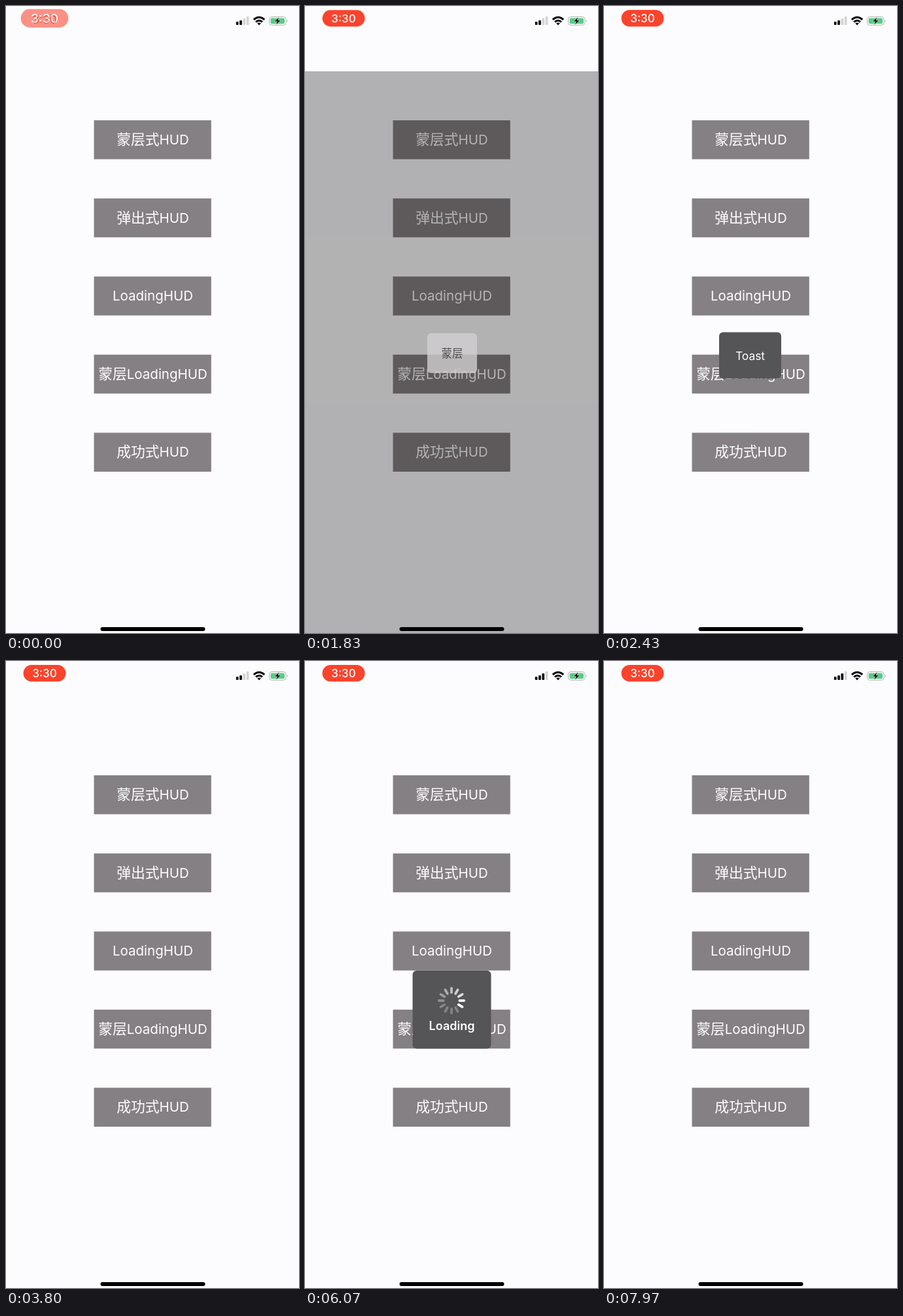
An HTML page for the animation above (8000 ms loop, 448 by 960 pixels).

```html
<!DOCTYPE html>
<html lang="zh">
<head>
<meta charset="utf-8">
<title>HUD</title>
<style>
html, body { margin: 0; width: 100%; height: 100%; overflow: hidden; background: #fcfcfe; }
svg { display: block; width: 100vw; height: 100vh; }
text { font-family: Inter, "Noto Sans CJK SC", "Noto Sans CJK", sans-serif; fill: #fff; text-anchor: middle; }
.label { font-size: 20.5px; }
.cjk { font-family: "Noto Sans CJK SC", "Noto Sans CJK", sans-serif; font-size: 21.8px; }
.hud { opacity: 0; }
#pill, #spinner { transform-box: fill-box; transform-origin: center; }
</style>
</head>
<body>
<svg viewBox="0 0 448 960" preserveAspectRatio="none">
  <rect width="448" height="960" fill="#fcfcfe"/>
  <g id="buttons"></g>

  <g id="mask" class="hud">
    <rect y="100" width="448" height="860" fill-opacity=".3"/>
    <rect x="187" y="501" width="76" height="61" rx="6" fill="#d0ced0" fill-opacity=".82"/>
    <text x="225" y="538" class="cjk" style="font-size:16.5px;fill:#4c4b4c">蒙层</text>
  </g>

  <g id="toast" class="hud">
    <rect x="176" y="499.5" width="95" height="71" rx="6" fill="#555456"/>
    <text x="223.5" y="542" font-size="17.4">Toast</text>
  </g>

  <g id="loading" class="hud">
    <rect x="164.5" y="474" width="120" height="119.5" rx="6" fill="#555456"/>
    <g transform="translate(224 520)"><g id="spinner"></g></g>
    <text x="224.5" y="565" font-size="18" font-weight="600">Loading</text>
  </g>

  <text id="ghost" x="59" y="27" font-size="17.5" font-weight="500" style="fill:#c87468">3:30</text>
  <g id="pill">
    <rect x="26.5" y="6" width="65" height="25.5" rx="12.7" fill="#fa432c"/>
    <text x="59" y="24.8" font-size="17" font-weight="500">3:30</text>
  </g>

  <g id="signal"></g>
  <g fill="none" stroke="#000" stroke-width="2.9">
    <path d="M378.8 20.8Q387 13.6 395.2 20.8"/>
    <path d="M382 24.4Q387 20 392 24.4"/>
    <path d="M384.2 26.6Q387 24.4 389.8 26.6L387 29.6Z" fill="#000" stroke="none"/>
  </g>
  <rect x="402.5" y="16.5" width="25.5" height="12.8" rx="3.8" fill="#fcfcfe" stroke="#b4b2b4"/>
  <rect x="404.5" y="18.5" width="21.5" height="8.8" rx="2.2" fill="#58cc84"/>
  <path d="M429.6 20.8Q431.6 22.9 429.6 25Z" fill="#a8a6a8"/>
  <path d="M417.6 16.8L410.6 23.8H414.6L412.8 29.2L420 21.8H416Z" fill="#000" stroke="#fcfcfe" stroke-width=".5"/>
  <rect x="144.5" y="951" width="160" height="6" rx="3" fill="#000"/>
</svg>
<script>
const LOOP = 8000;
const $ = id => document.getElementById(id);

function add(parent, tag, attrs) {
  const node = document.createElementNS("http://www.w3.org/2000/svg", tag);
  for (const key in attrs) node.setAttribute(key, attrs[key]);
  return parent.appendChild(node);
}

// Steps are [time in ms, value]; values hold before the first and after the last.
function play(node, property, steps, easing = "linear") {
  const full = [[0, steps[0][1]], ...steps, [LOOP, steps[steps.length - 1][1]]];
  const frames = full.map(([time, value]) => ({ offset: time / LOOP, [property]: value, easing }));
  node.animate(frames, { duration: LOOP, iterations: Infinity });
}

const titles = [["蒙层式", "HUD"], ["弹出式", "HUD"], ["", "LoadingHUD"], ["蒙层", "LoadingHUD"], ["成功式", "HUD"]];
titles.forEach(([chinese, latin], i) => {
  const y = 175 + i * 119.6;
  add($("buttons"), "rect", { x: 134.5, y, width: 179.3, height: 59.6, fill: "#858083" });
  const text = add($("buttons"), "text", { x: 224.5, y: y + 37, class: "label" });
  if (chinese) add(text, "tspan", { class: "cjk" }).textContent = chinese;
  add(text, "tspan", {}).textContent = latin;
});

const bars = [5, 7, 10, 13].map((height, i) => add($("signal"), "rect", {
  x: 351.8 + i * 5.3, y: 29 - height, width: 3.7, height, rx: 1, fill: i < 2 ? "#000" : "#d6d3d0"
}));
play(bars[2], "fill", [[5900, "#d6d3d0"], [5900, "#000"]]);

for (let i = 0; i < 12; i++) {
  add($("spinner"), "rect", {
    x: -1.9, y: -21, width: 3.8, height: 10.5, rx: 1.9, fill: "#fff",
    transform: `rotate(${i * 30})`,
    opacity: Math.max(.28, 1 - ((16 - i) % 12) * .095)
  });
}
$("spinner").animate(
  [{ transform: "rotate(0deg)" }, { transform: "rotate(360deg)" }],
  { duration: 1000, iterations: Infinity, easing: "steps(12)" }
);

play($("mask"), "opacity", [[820, 0], [1080, 1], [1810, 1], [2080, 0]], "ease-in-out");
play($("toast"), "opacity", [[2180, 0], [2400, 1], [3250, 1], [3520, 0]], "ease-in-out");
play($("loading"), "opacity", [[5560, 0], [5830, 1], [7560, 1], [7830, 0]], "ease-in-out");

play($("pill"), "transform", [[30, "scale(1.12)"], [300, "scale(1)"]], "ease-out");
play($("pill"), "opacity", [[30, .58], [300, 1]], "ease-out");
play($("ghost"), "opacity", [[30, 1], [300, 0]]);
</script>
</body>
</html>
```
